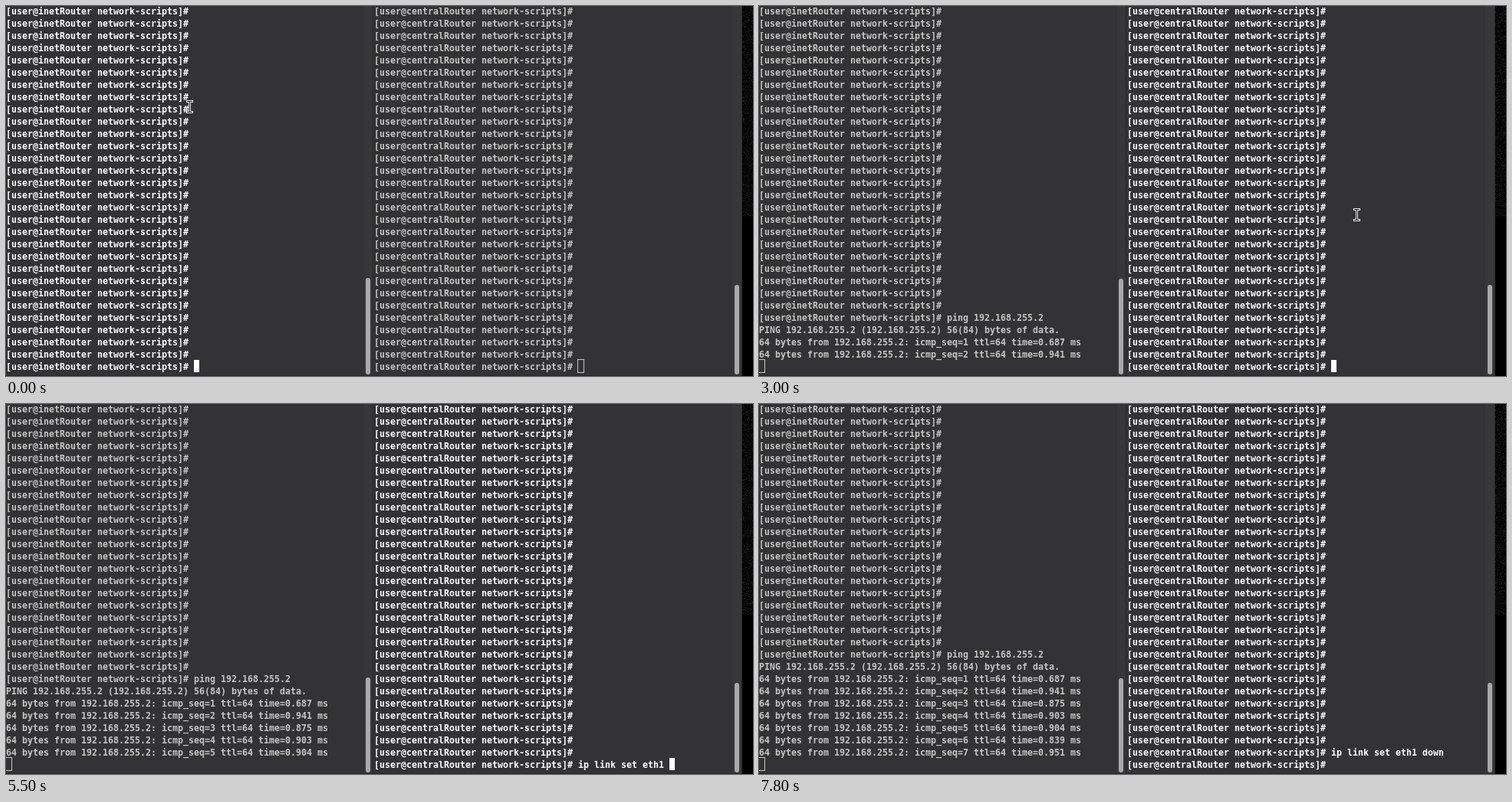
Recreate the animation shown at these times as an HTML page with a canvas. Size 974 by 483 pixels, loop 8000 ms.

```html
<!DOCTYPE html>
<html lang="en">
<head>
<meta charset="utf-8">
<title>Two terminals</title>
<style>
  html, body { margin: 0; width: 100%; height: 100%; overflow: hidden; background: #000; }
  canvas { display: block; }
</style>
</head>
<body>
<canvas id="stage" width="974" height="483"></canvas>
<script>
const ctx = document.getElementById('stage').getContext('2d');
const LOOP = 8000, CELL = 7, ROW = 16, ROWS = 30, TOP = -2;
const BG = '#333335', BRIGHT = '#ffffff', DIM = '#c6c6c4';
const HOST = '192.168.255.2';
const LEFT = '[user@inetRouter network-scripts]# ';
const RIGHT = '[user@centralRouter network-scripts]# ';

const ENTER = 2000, FOCUS = 3000, RUN = 7500;
const replies = [
  [2000, 0.687], [2500, 0.941], [3500, 0.875], [4500, 0.903],
  [5500, 0.904], [6100, 0.839], [7200, 0.951]
];

// Text typed in the right pane, by start time
const typed = [
  [0, ''], [3500, 'ip link set eth1 up'], [5500, 'ip link set eth1 '],
  [6200, 'ip link set eth1 d'], [6400, 'ip link set eth1 do'],
  [6500, 'ip link set eth1 dow'], [6700, 'ip link set eth1 down'], [RUN, '']
];

// Spans in which the focused cursor is dark
const blinks = [[200, 600], [1100, 1400], [2500, 3000], [3900, 5000], [5100, 5500], [7800, 8000]];

const scrollTops = [[0, 355], [2000, 356], [3300, 357], [7200, 358]];

const at = (steps, t) => steps.filter(s => s[0] <= t).pop()[1];

function leftLines(t) {
  if (t < ENTER) return [LEFT + (t < 600 ? '' : 'ping ' + HOST)];
  const lines = [LEFT + 'ping ' + HOST, `PING ${HOST} (${HOST}) 56(84) bytes of data.`];
  replies.forEach(([time, ms], i) => {
    if (t >= time) lines.push(`64 bytes from ${HOST}: icmp_seq=${i + 1} ttl=64 time=${ms.toFixed(3)} ms`);
  });
  return [...lines, ''];
}

function rightLines(t) {
  const line = RIGHT + at(typed, t);
  return t < RUN ? [line] : [RIGHT + 'ip link set eth1 down', line];
}

function pointerAt(t) {
  if (t < 600) return [239, 131];
  if (t < 2100 || t >= 3500) return null;
  if (t >= 3000) return [779, 272];
  const p = Math.min(1, (Math.floor(t / 100) - 21) / 4);
  return [Math.round(330 + 403 * p), Math.round(206 + 81 * p * p)];
}

function box(color, x, y, w, h) {
  ctx.fillStyle = color;
  ctx.fillRect(x, y, w, h);
}

function drawCursor(x, y, focused, lit) {
  if (!focused) {
    ctx.strokeStyle = DIM;
    ctx.lineWidth = 1;
    ctx.strokeRect(x - 0.5, y - 0.5, CELL + 1, ROW + 1);
  } else if (lit) {
    box(BRIGHT, x, y, CELL, ROW);
  }
}

function drawPane(x, prompt, tail, focused, lit) {
  const lines = [...Array(ROWS - tail.length).fill(prompt), ...tail];
  ctx.fillStyle = focused ? BRIGHT : DIM;
  lines.forEach((line, row) => {
    const y = TOP + row * ROW + 13;
    for (let i = 0; i < line.length; i++) {
      if (line[i] !== ' ') ctx.fillText(line[i], x + i * CELL, y);
    }
  });
  drawCursor(x + lines[ROWS - 1].length * CELL, TOP + (ROWS - 1) * ROW, focused, lit);
}

function drawSlider(x, y) {
  ctx.fillStyle = '#a9a9a9';
  ctx.beginPath();
  ctx.roundRect(x, y, 6, 481 - y, 3);
  ctx.fill();
}

function drawBackdrop() {
  box(BG, 0, 0, 960, 483);
  box('#373638', 467, 0, 11, 483);
  box('#373638', 947, 0, 12, 483);
  box('#29282a', 478, 0, 1, 483);
  box('#29282a', 959, 0, 1, 483);
  box('#29282a', 0, 482, 960, 1);
  box('#000', 960, 0, 14, 483);
  let seed = 7;
  const rand = () => (seed = (seed * 16807) % 2147483647) / 2147483647;
  for (let y = 0; y < 275; y++) {
    for (let x = 960; x < 974; x++) {
      const v = Math.round(34 * rand() ** 3);
      box(`rgb(${v},${v},${v})`, x, y, 1, 1);
    }
  }
}

function drawPointer([x, y]) {
  const beam = (color, g) => {
    box(color, x - 3 - g, y - 7 - g, 7 + 2 * g, 1 + 2 * g);
    box(color, x - 3 - g, y + 7 - g, 7 + 2 * g, 1 + 2 * g);
    box(color, x - g, y - 7, 1 + 2 * g, 15);
  };
  beam('#f4f4f4', 1);
  beam('#111', 0);
}

function draw(t) {
  const lit = !blinks.some(([from, to]) => t >= from && t < to);
  const onLeft = t < FOCUS;
  drawBackdrop();
  ctx.font = 'bold 11.63px "DejaVu Sans Mono", monospace';
  ctx.textBaseline = 'alphabetic';
  drawPane(0, LEFT, leftLines(t), onLeft, lit);
  drawPane(480, RIGHT, rightLines(t), !onLeft, lit);
  drawSlider(469, at(scrollTops, t));
  drawSlider(950, 364);
  const pointer = pointerAt(t);
  if (pointer) drawPointer(pointer);
}

// Everything changes on a 100 ms grid
let last = -1;
const start = performance.now();
function tick() {
  const t = Math.floor(((performance.now() - start) % LOOP) / 100) * 100;
  if (t !== last) draw(last = t);
  requestAnimationFrame(tick);
}
tick();
</script>
</body>
</html>
```
